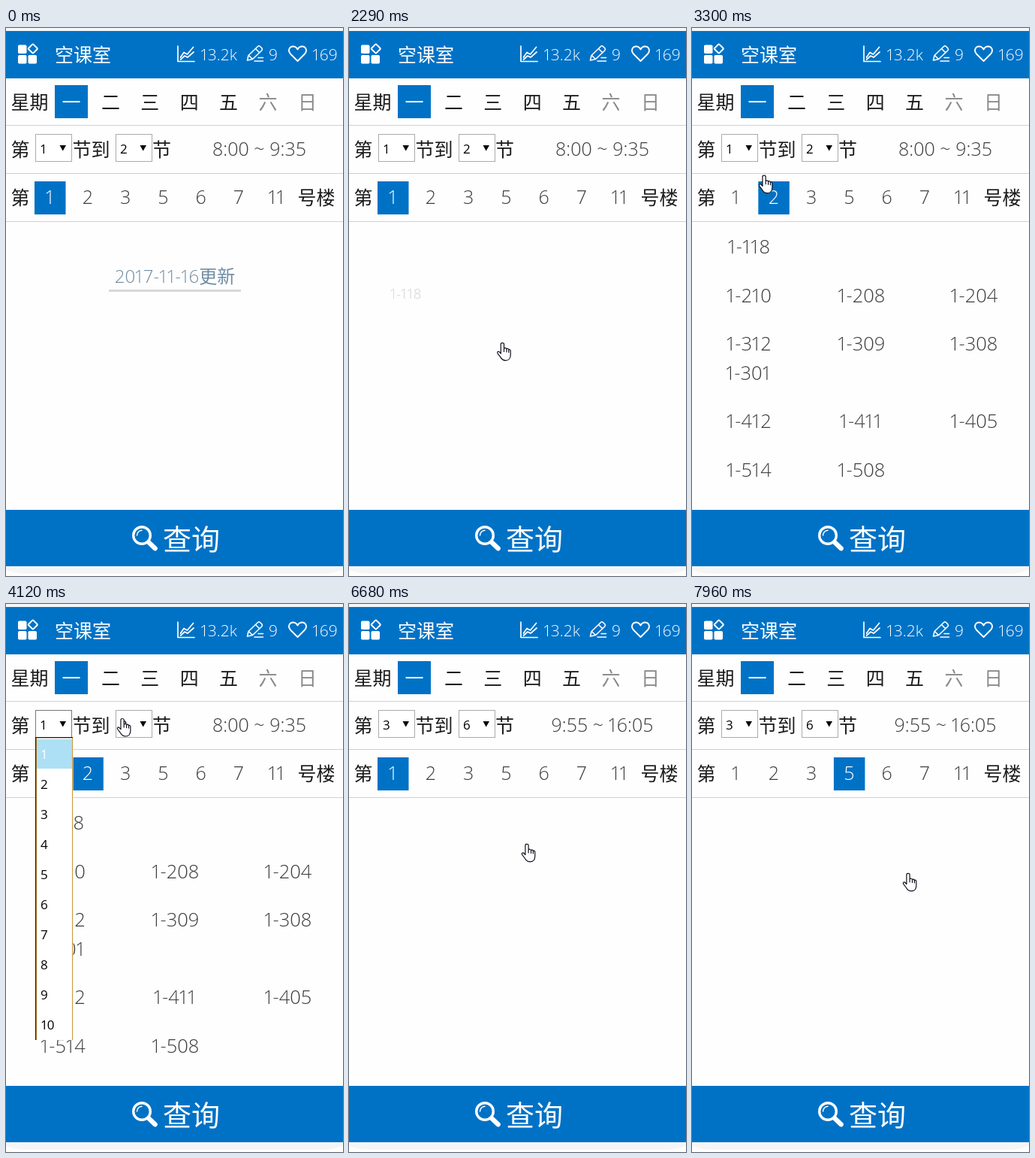
Animation of 449x729 px, one loop 8000 ms. Source, as an HTML page:

```html
<!DOCTYPE html>
<html lang="zh-CN">
<head>
<meta charset="utf-8">
<title>空课室</title>
<style>
html, body { margin: 0; width: 100%; height: 100%; overflow: hidden; background: #fefefe; }
svg { display: block; width: 449px; height: 729px; }
text { font-family: "Open Sans", "Noto Sans CJK SC", "Noto Sans CJK", sans-serif; font-weight: 300; }
.opt { font-weight: 400; }
</style>
</head>
<body>
<svg id="stage" viewBox="0 0 449 729"></svg>
<script>
const LOOP = 8000, BLUE = '#0072c6', INK = '#1c1c1c', SOFT = '#3c3c3c';
const stage = document.getElementById('stage');

// The digit 1 is set narrower than the other figures.
function label(str, x, y, size, fill, anchor = 'start', extra = '') {
  const chars = [...str], k = size * 0.065;
  const dx = chars.map((c, i) =>
    i ? (-((c === '1') + (chars[i - 1] === '1')) * k).toFixed(2) : 0).join(' ');
  return `<text x="${x}" y="${y}" dx="${dx}" font-size="${size}" fill="${fill}" ` +
    `text-anchor="${anchor}" xml:space="preserve" ${extra}>${str}</text>`;
}
const rect = (x, y, w, h, fill, extra = '') =>
  `<rect x="${x}" y="${y}" width="${w}" height="${h}" fill="${fill}" ${extra}/>`;
const stroke = (d, color, width) =>
  `<path d="${d}" fill="none" stroke="${color}" stroke-width="${width}" ` +
  'stroke-linecap="round" stroke-linejoin="round"/>';

const days = [...'一二三四五六日'];
const halls = ['1', '2', '3', '5', '6', '7', '11'];
const hallX = i => 58.5 + i * 50.3;

function header() {
  const tile = (x, y) => rect(x, y, 11.5, 11.5, '#fff', 'rx="1.8"');
  return rect(0, 0, 449, 4, '#f4f6f8') + rect(0, 4, 449, 63, BLUE) +
    tile(16, 22.5) + tile(16, 36) + tile(29.5, 36) +
    '<rect x="31.3" y="23" width="9" height="9" rx="1" fill="none" stroke="#fff" ' +
    'stroke-width="2" transform="rotate(45 35.8 27.5)"/>' +
    label('空课室', 65, 44.5, 25, '#fff') +
    stroke('M229 24V44.5H251M232.5 39L237 32.5L241.5 35L249.5 25.5M232.5 42L238 37L242 39L250 32', '#fff', 1.7) +
    label('13.2k', 258, 43, 21, '#fff') +
    stroke('M321.5 43L323 36.5L335.5 24.5Q337 23 338.5 24.5L341 27Q342 28.5 340.7 30L328.5 41.5ZM332.5 27.5L338 33M323.5 36.5L328.5 41.5M331 44H342.5M336 39.5H342.5', '#fff', 1.6) +
    label('9', 350, 43, 21, '#fff') +
    stroke('M388.5 44L379 34.5C374.5 29 378.5 24.5 382.5 24.5C385.5 24.5 387.5 26.5 388.5 28.5C389.5 26.5 391.5 24.5 394.5 24.5C398.5 24.5 402.5 29 398 34.5Z', '#fff', 1.9) +
    label('169', 407, 43, 21, '#fff');
}

function select(id, x) {
  return `<rect id="${id}Box" x="${x + .5}" y="141.5" width="48" height="36" fill="#fff"/>` +
    `<text id="${id}Val" class="opt" x="${x + 6}" y="166.5" font-size="17" fill="#000"></text>` +
    `<path d="M${x + 32.5} 156H${x + 41}L${x + 36.7} 163.5Z" fill="#000"/>`;
}

function menu(id, x) {
  let s = `<g id="${id}Menu">` + rect(x, 177, 50.5, 403, '#fff') +
    `<rect id="${id}Bar" x="${x + 2}" width="47" height="39" fill="#ade0f5"/>`;
  for (let i = 0; i < 10; i++)
    s += label(String(i + 1), x + 7, 206 + i * 40, 17, '#000', 'start', 'class="opt"');
  return s + `<path d="M${x + 1.6} 580V178" stroke="#d59a2c" stroke-width="1"/>` +
    `<path d="M${x + .6} 580V177.6H${x + 50}" fill="none" stroke="#1a1408" stroke-width="1.2"/>` +
    `<path d="M${x + 49.6} 178V580" stroke="#c98f2b" stroke-width="1"/></g>`;
}

const rowY = [300, 365, 429, 468, 532, 597];
const colX = [75, 225, 375];
const results = [
  { enter: 2260, leave: 6480, rooms: [['118'], ['210', '208', '204'], ['312', '309', '308'], ['301'], ['412', '411', '405'], ['514', '508']] },
  { enter: 6920, leave: 7770, rooms: [['118'], ['210', '208', '204'], ['312', '309'], ['301'], ['412', '405'], ['514', '508']] }
];

function resultGroup(set, n) {
  let s = `<g id="set${n}">`;
  set.rooms.forEach((row, r) => row.forEach((room, c) => {
    s += `<g data-row="${r}" data-col="${c}">` + label('1-' + room, 0, 9, 25.5, SOFT, 'middle') + '</g>';
  }));
  return s + '</g>';
}

const hand = 'M-2.1 2.2C-2.1 -.2 2.1 -.2 2.1 2.2V8.3C2.6 6.7 5.3 6.9 5.5 8.8' +
  'C6 7.5 8.2 7.9 8.4 9.8C9 8.7 10.8 9.3 10.8 11.2V16.5C10.8 21.3 8 23.9 4.5 23.9' +
  'C.5 23.9 -1.3 22 -2.9 19L-6.4 14.4C-7.5 12.3 -5.3 11.2 -4.1 12.5L-2.1 14.6Z';

stage.innerHTML =
  rect(0, 0, 449, 729, '#fefefe') + header() +
  [129.5, 193.5, 257.5].map(y => `<path d="M0 ${y}H449" stroke="#d0d0d0"/>`).join('') +
  label('星期', 6.5, 107.5, 25, INK) + rect(65, 76, 44, 44, BLUE) +
  days.map((d, i) => label(d, 87 + i * 52.4, 107.5, 25, i ? (i > 4 ? '#8a8a8a' : INK) : '#fff', 'middle')).join('') +
  label('第', 6.5, 170.5, 25, INK) + label('节到', 88.5, 170.5, 25, INK) + label('节', 195, 170.5, 25, INK) +
  select('from', 39) + select('to', 146) +
  ['8:00 ~ 9:35', '9:55 ~ 11:30', '9:55 ~ 16:05'].map((s, i) =>
    label(s, 337.5, 170, 25, SOFT, 'middle', `id="span${i}"`)).join('') +
  label('第', 6.5, 234.5, 25, INK) + label('号楼', 388.5, 234.5, 25, INK) +
  `<rect id="hall" y="204" width="41.5" height="44" fill="${BLUE}"/>` +
  halls.map((h, i) => label(h, hallX(i), 234, 25, SOFT, 'middle', `id="hall${i}"`)).join('') +
  '<g id="date">' + label('2017-11-16更新', 225, 339, 24, '#6f8ca3', 'middle') +
  rect(137, 348, 176, 3, '#d6d8db') + '</g>' +
  results.map(resultGroup).join('') +
  menu('from', 39) + menu('to', 145) +
  rect(0, 641, 449, 75, BLUE) +
  rect(0, 716, 449, 13, '#fefefe') +
  '<path d="M0 716H449V721Q436 726 420 726H29Q13 726 0 721Z" fill="#f5f5f6"/>' +
  '<circle cx="181" cy="675" r="11.3" fill="none" stroke="#fff" stroke-width="3.4"/>' +
  stroke('M174.5 675Q175 669 181 668.3', '#fff', 1.4) +
  stroke('M190.5 684.5L198.6 692.2', '#fff', 6.4) +
  label('查询', 209, 694, 38, '#fff') +
  `<g id="hand"><path d="${hand}" fill="#fff"/>` +
  stroke(hand + 'M2.1 8.3V12M5.5 8.8V12.5M8.4 9.8V13', '#10101c', 1.2) + '</g>';

const el = id => document.getElementById(id);
const show = (node, on) => node.setAttribute('visibility', on ? 'visible' : 'hidden');
const clamp = v => Math.max(0, Math.min(1, v));

// Pointer path: time, x, y of the fingertip
const path = [
  [590, 206, 732], [780, 192, 668], [960, 199, 618], [1270, 226, 678], [1810, 226, 678],
  [2050, 205, 420], [2260, 205, 420], [2660, 155, 293], [3040, 112, 218], [3190, 112, 218],
  [3450, 65, 156], [3720, 64, 180], [3990, 132, 154], [4120, 155, 152], [4260, 146, 178],
  [4480, 64, 278], [4820, 165, 156], [4850, 165, 156], [5050, 165, 396], [5200, 165, 396],
  [5560, 67, 201], [5680, 58, 222], [5860, 58, 222], [6300, 212, 702], [6450, 220, 690],
  [6680, 237, 319], [6920, 237, 319], [7230, 209, 224], [7620, 226, 668], [7770, 226, 668],
  [7960, 288, 358], [8000, 288, 358]
];

function slope(i, a) {
  const p = path[i - 1], q = path[i], n = path[i + 1];
  const still = (u, v) => u[1] === v[1] && u[2] === v[2];
  if (!p || !n || still(p, q) || still(q, n)) return 0;
  return (n[a] - p[a]) / (n[0] - p[0]);
}

function pointer(t) {
  let i = 0;
  while (i < path.length - 2 && t >= path[i + 1][0]) i++;
  const A = path[i], B = path[i + 1], d = B[0] - A[0], u = clamp((t - A[0]) / d);
  const u2 = u * u, u3 = u2 * u;
  return [1, 2].map(a =>
    (2 * u3 - 3 * u2 + 1) * A[a] + (u3 - 2 * u2 + u) * d * slope(i, a) +
    (3 * u2 - 2 * u3) * B[a] + (u3 - u2) * d * slope(i + 1, a));
}

// Latest value whose start time has passed
const at = (t, steps) => steps.reduce((v, s) => t >= s[0] ? s[1] : v, null);

// Fades a group upwards once its time is over
function leave(node, t, start, shown = true) {
  const out = clamp((t - start) / 190);
  show(node, shown && out < 1);
  node.setAttribute('opacity', 1 - out);
  node.setAttribute('transform', `translate(0 ${-18 * out})`);
}

function drawResults(set, n, t) {
  const g = el('set' + n);
  leave(g, t, set.leave, t >= set.enter);
  for (const item of g.children) {
    const r = +item.dataset.row;
    const rest = (1 - clamp((t - set.enter - r * 50) / 500)) ** 4;
    item.setAttribute('transform',
      `translate(${colX[item.dataset.col]} ${rowY[r] - 9 + 80 * rest}) scale(${1 - .33 * rest})`);
    item.setAttribute('opacity', 1 - rest);
  }
}

function drawSelect(id, value, open, focus, y) {
  el(id + 'Val').textContent = value;
  el(id + 'Box').setAttribute('stroke', focus ? '#777' : '#ababab');
  const list = el(id + 'Menu');
  show(list, open);
  const pick = y > 182 ? Math.min(9, Math.floor((y - 180) / 40)) : value - 1;
  el(id + 'Bar').setAttribute('y', 180 + pick * 40);
  list.querySelectorAll('text').forEach((o, i) => o.setAttribute('fill', i === pick ? '#fff' : '#000'));
}

function draw(t) {
  const [x, y] = pointer(t);
  show(el('hand'), t >= 590);
  el('hand').setAttribute('transform', `translate(${x} ${y})`);

  leave(el('date'), t, 1840);
  results.forEach((set, n) => drawResults(set, n, t));

  const hall = at(t, [[0, 0], [3190, 1], [5860, 0], [7250, 3]]);
  el('hall').setAttribute('x', 38 + hall * 50.3);
  halls.forEach((h, i) => el('hall' + i).setAttribute('fill', i === hall ? '#fff' : SOFT));

  const span = at(t, [[0, 0], [4500, 1], [5210, 2]]);
  [0, 1, 2].forEach(i => show(el('span' + i), i === span));
  drawSelect('from', span ? 3 : 1, t >= 3520 && t < 4500, t >= 3520 && t < 4840, x < 92 ? y : 0);
  drawSelect('to', [2, 4, 6][span], t >= 4850 && t < 5210, t >= 4840 && t < 5860, y);
}

const begin = performance.now();
function tick() {
  draw((performance.now() - begin) % LOOP);
  requestAnimationFrame(tick);
}
tick();
</script>
</body>
</html>
```
